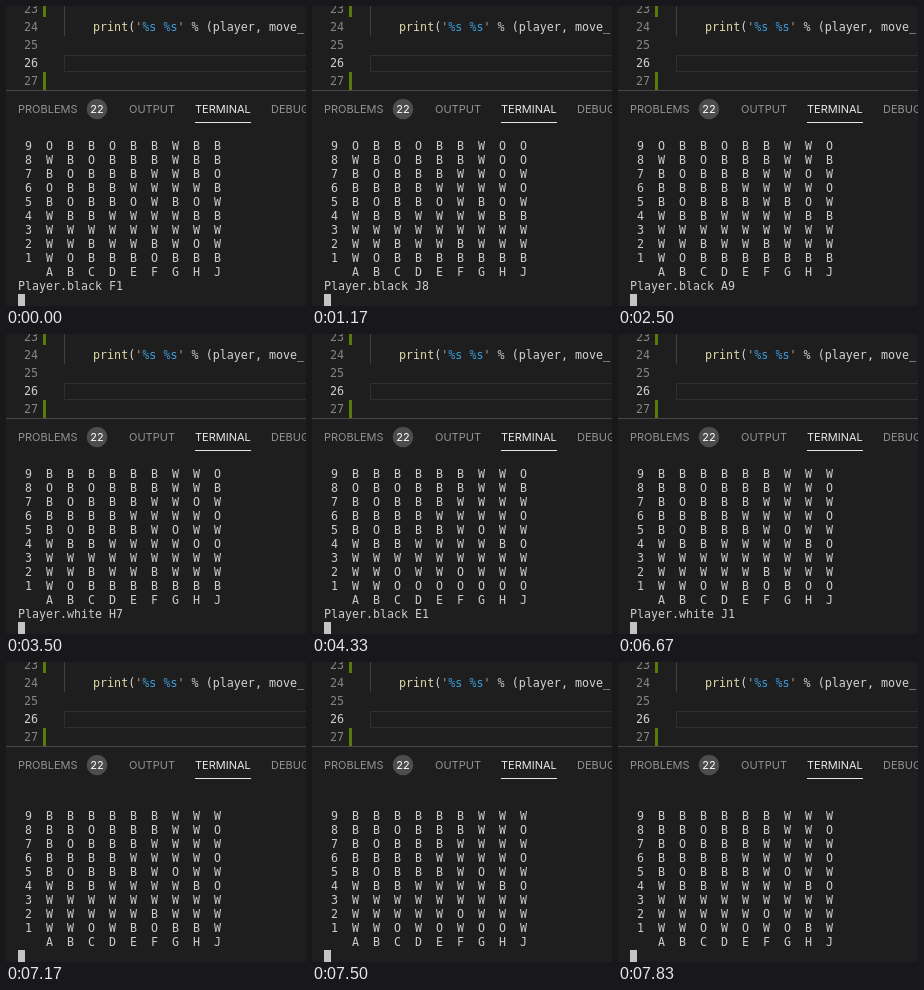
These frames come from a looping animation (300x300 px, 8 s). An HTML page:

```html
<!DOCTYPE html>
<html lang="en">
<head>
<meta charset="utf-8">
<title>Go bots in a terminal</title>
<style>
  html, body { margin: 0; width: 100%; height: 100%; overflow: hidden; background: #1e1e1e; }
  svg { display: block; width: 100vw; height: 100vh; }
  text { white-space: pre; }
  .editor { font: 11.7px "DejaVu Sans Mono", monospace; fill: #d4d4d4; }
  .terminal { font: 11.63px "DejaVu Sans Mono", monospace; fill: #cccccc; }
  .tabs { font: 11px Inter, sans-serif; fill: #929292; }
  .number { fill: #858585; }
  .active { fill: #e7e7e7; }
  .call { fill: #dcdcaa; }
  .string { fill: #ce9178; }
  .format { fill: #3f9fe0; }
</style>
</head>
<body>
<svg viewBox="0 0 300 300">
  <rect width="300" height="300" fill="#1e1e1e"/>
  <g class="editor">
    <path d="M58.5 0V30" stroke="#404040"/>
    <path d="M300 49.5H58.5V65.5H300" fill="none" stroke="#303030"/>
    <path d="M38.5 0V11M38.5 66V84" stroke="#587c0c" stroke-width="3"/>
    <g class="number">
      <text x="18" y="7">23</text>
      <text x="18" y="25">24</text>
      <text x="18" y="43">25</text>
      <text x="18" y="61" fill="#d0d0d0">26</text>
      <text x="18" y="79">27</text>
    </g>
    <text x="87" y="25"><tspan class="call">print</tspan>(<tspan class="string">'</tspan><tspan class="format">%s</tspan> <tspan class="format">%s</tspan><tspan class="string">'</tspan> % (player, move_</text>
  </g>
  <path d="M0 84.5H300" stroke="#474747"/>
  <g class="tabs">
    <text x="12" y="107">PROBLEMS</text>
    <circle cx="91" cy="103" r="10.3" fill="#4d4d4d"/>
    <text x="91" y="107" text-anchor="middle" fill="#fff">22</text>
    <text x="123" y="107">OUTPUT</text>
    <text x="189" y="107" class="active">TERMINAL</text>
    <path d="M189 116.5H245" stroke="#e7e7e7"/>
    <text x="265" y="107">DEBUG CONSOLE</text>
  </g>
  <g class="terminal" id="terminal"></g>
  <rect x="12" y="288" width="7" height="12" fill="#c4c4c4"/>
</svg>
<script>
const LOOP = 8000, TICKS = 48, LINE = 14.05, BOTTOM = 284;
const COLUMNS = 'ABCDEFGHJ';

// Rows run from 9 down to 1; O marks an empty point.
const opening = `OBBOBBWBB
WBOBBBWBB
BOBBBWWBO
OBBBWWWWB
BOBBOWBOW
WBBWWWWBB
WWWWWWWWW
WWBWWBWOW
WOBBBOBBB`;

// Black moves first; each move is paired with the tick on which its board is printed.
const moves = 'F1 H2 A6 J7 J8 H9 E5 H8 A9 H5 D9 H7 H4 B1 E1 J9 A8 C2 G1 D1 F2 J1 H1 F1 H1'.split(' ');
const ticks = [0, 2, 4, 6, 7, 9, 11, 13, 15, 17, 19, 20, 22, 24,
  26, 28, 30, 32, 34, 36, 38, 40, 42, 43, 45, 47];
const SLOW_FROM = 23; // from here on the move line lags one tick behind the board

const neighbours = ([r, c]) => [[r - 1, c], [r + 1, c], [r, c - 1], [r, c + 1]]
  .filter(([y, x]) => y >= 0 && y < 9 && x >= 0 && x < 9);

function captured(board, start) {
  const colour = board[start[0]][start[1]];
  const group = [start], seen = new Set([String(start)]);
  for (const point of group) {
    for (const next of neighbours(point)) {
      const stone = board[next[0]][next[1]];
      if (stone === 'O') return [];
      if (stone === colour && !seen.has(String(next))) {
        seen.add(String(next));
        group.push(next);
      }
    }
  }
  return group;
}

function play(board, move, colour) {
  const next = board.map(row => [...row]);
  const point = [9 - move[1], COLUMNS.indexOf(move[0])];
  const rival = colour === 'B' ? 'W' : 'B';
  next[point[0]][point[1]] = colour;
  for (const p of neighbours(point)) {
    if (next[p[0]][p[1]] === rival) {
      for (const [r, c] of captured(next, p)) next[r][c] = 'O';
    }
  }
  return next;
}

const boards = [opening.split('\n').map(row => [...row])];
moves.forEach((move, i) => boards.push(play(boards[i], move, 'BW'[i % 2])));

const terminal = document.getElementById('terminal');
const lines = Array.from({ length: 11 }, (_, i) => {
  const text = document.createElementNS('http://www.w3.org/2000/svg', 'text');
  text.setAttribute('x', 12);
  text.setAttribute('y', BOTTOM - (10 - i) * LINE);
  return terminal.appendChild(text);
});

function screenAt(tick) {
  const turn = ticks.filter(t => t <= tick).length - 1;
  const rows = boards[turn].map((row, i) => ` ${9 - i}  ${row.join('  ')}`);
  rows.push('    ' + [...COLUMNS].join('  '));
  const thinking = turn >= SLOW_FROM && tick === ticks[turn];
  if (thinking) rows.unshift('');
  else rows.push(`Player.${turn % 2 ? 'white' : 'black'} ${moves[turn]}`);
  return rows;
}

let shown = -1;
const began = performance.now();
function draw() {
  const time = (performance.now() - began) % LOOP;
  const tick = Math.floor((time + 4) * TICKS / LOOP) % TICKS;
  if (tick !== shown) {
    screenAt(tick).forEach((row, i) => { lines[i].textContent = row; });
    shown = tick;
  }
  requestAnimationFrame(draw);
}
draw();
</script>
</body>
</html>
```
